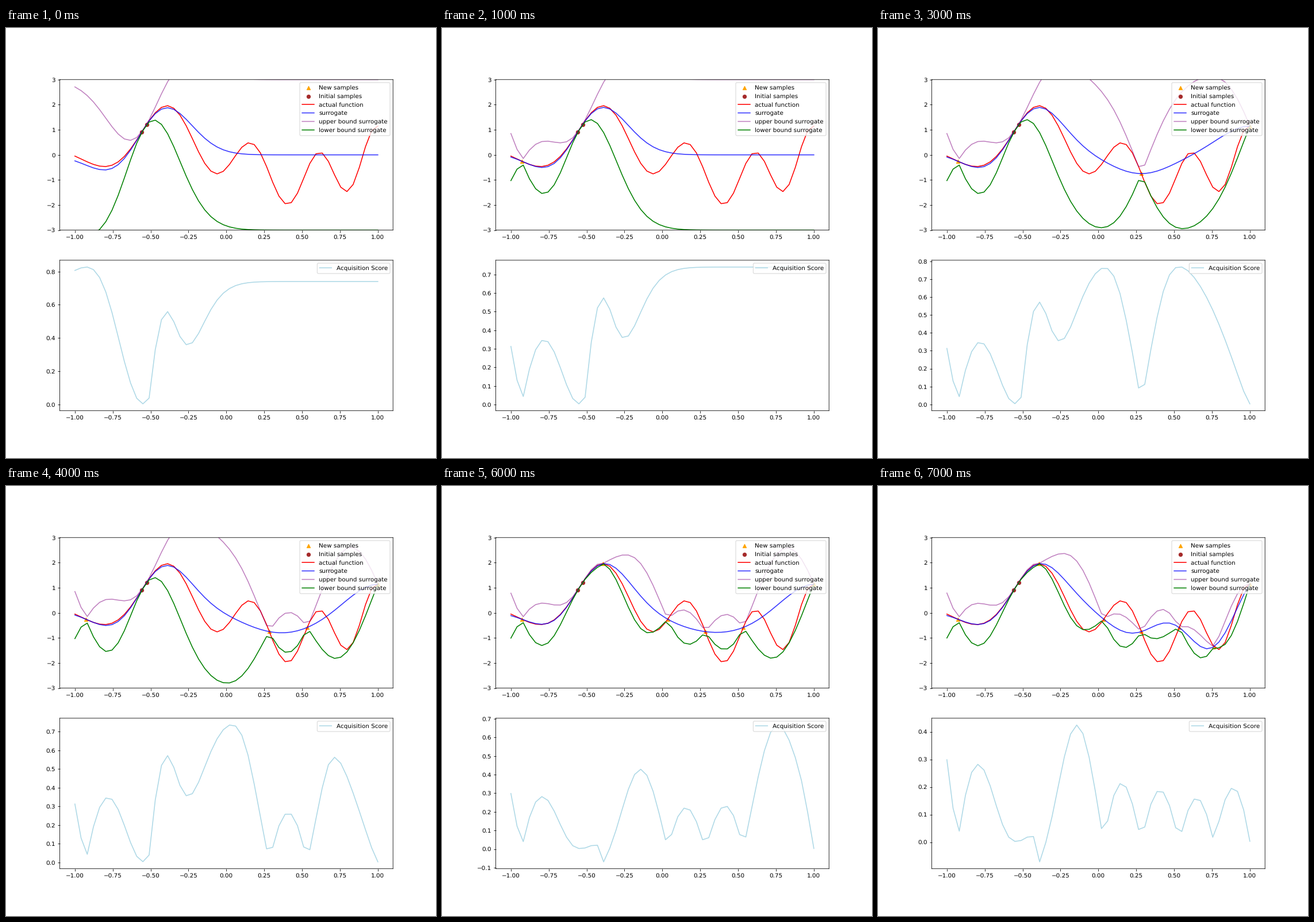
These frames come from a looping animation (748x748 px, 8000 ms). A matplotlib script:

```python
import math

import numpy as np
import matplotlib.pyplot as plt
from matplotlib.animation import FuncAnimation

LENGTH = 0.2   # RBF kernel length scale
NOISE = 1e-5   # variance added to the kernel diagonal
XI = 0.1       # exploration margin
BAND = 3       # width of the confidence band in deviations

# Soft, unsnapped rendering of lines and glyphs.
plt.rcParams.update({"path.snap": False, "text.hinting": "none"})

grid = np.linspace(-1, 1, 50)
initial = np.array([-0.559, -0.5263])
# One of these points is sampled per step, in this order.
queries = np.array([-0.929, 1.0, 0.2837, 0.5335, 0.0355, -0.392, 0.7628])

normal_cdf = np.vectorize(lambda z: 0.5 * (1 + math.erf(z / math.sqrt(2))))


def objective(x):
    return np.sin(3 * (x + 2) ** 2) - np.sin(10 * x / 3)


def kernel(a, b):
    return np.exp(-(a[:, None] - b[None, :]) ** 2 / (2 * LENGTH ** 2))


def posterior(xs):
    """Mean and deviation on the grid of a Gaussian process through xs."""
    cov = kernel(xs, xs) + NOISE * np.eye(len(xs))
    cross = kernel(xs, grid)
    weights = np.linalg.solve(cov, cross)
    mean = weights.T @ objective(xs)
    var = 1 - np.sum(cross * weights, axis=0)
    return mean, np.sqrt(np.clip(var, 1e-12, None))


def acquisition(mean, std, best):
    gain = mean - best
    p = normal_cdf(gain / std)
    return (gain - XI) * p + std * (1 - p)


fig, (top, bottom) = plt.subplots(2, 1, figsize=(10, 10), dpi=74.8)


def draw(step):
    new = queries[:step]
    xs = np.concatenate([initial, new])
    mean, std = posterior(xs)
    score = acquisition(mean, std, objective(xs).max())

    top.clear()
    top.scatter(new, objective(new), marker="^", color="orange",
                label="New samples")
    top.scatter(initial, objective(initial), color="brown",
                label="Initial samples")
    top.plot(grid, objective(grid), color="red", label="actual function")
    top.plot(grid, mean, color="blue", alpha=0.8, label="surrogate")
    top.plot(grid, mean + BAND * std, color="purple", alpha=0.5,
             label="upper bound surrogate")
    top.plot(grid, mean - BAND * std, color="green",
             label="lower bound surrogate")
    top.set_xlim(-1.1, 1.1)
    top.set_ylim(-3, 3)
    top.legend(loc="upper right")

    bottom.clear()
    bottom.plot(grid, score, color="lightblue", label="Acquisition Score")
    bottom.set_xlim(-1.1, 1.1)
    bottom.legend(loc="upper right")
    return []


anim = FuncAnimation(fig, draw, frames=len(queries) + 1, interval=1000,
                     repeat=True)
plt.show()
```
